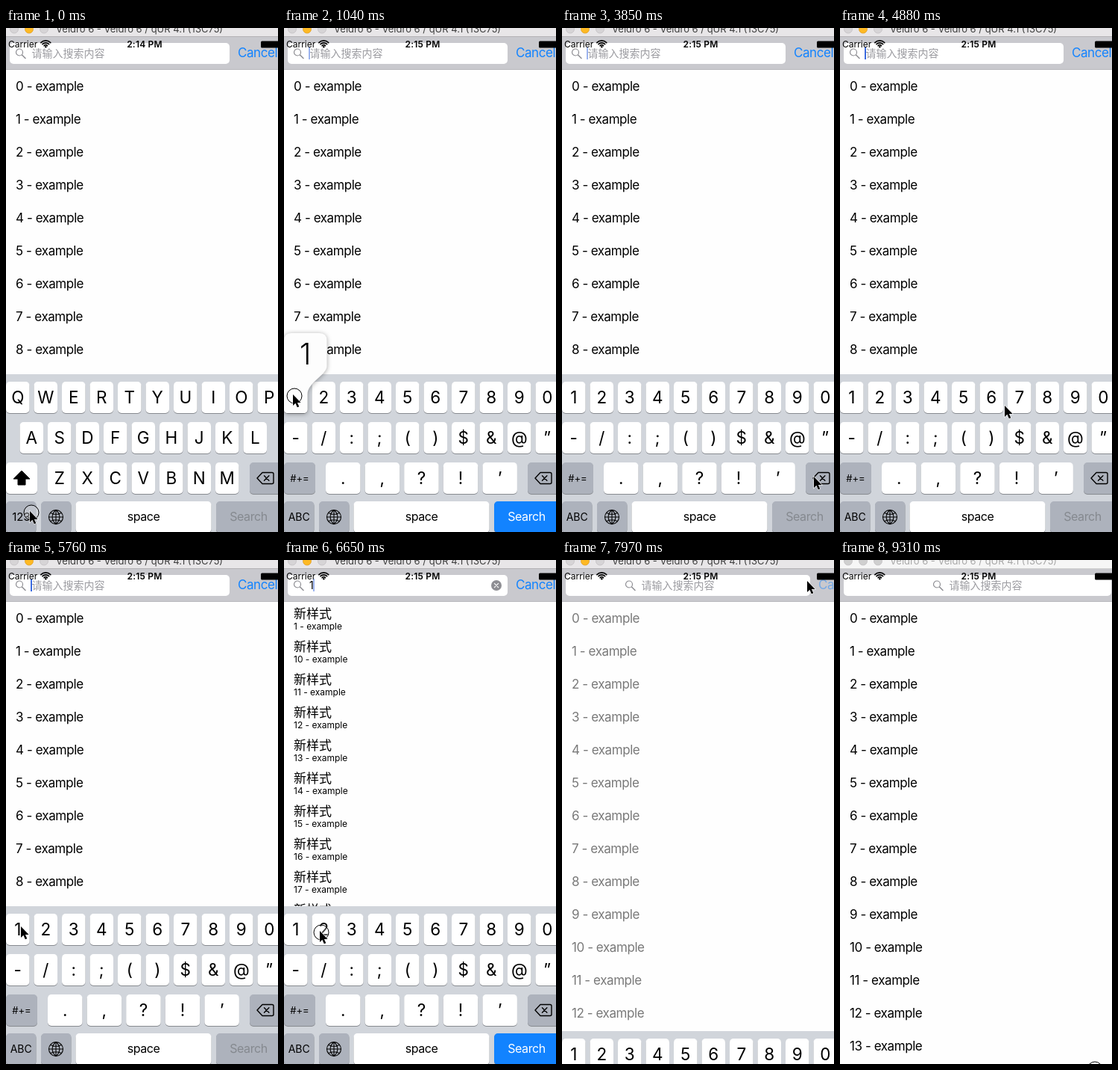
An HTML page for the animation above (9.41 s loop, 365 by 674 pixels).

```html
<!DOCTYPE html>
<html lang="zh-CN">
<head>
<meta charset="utf-8">
<title>Search demo</title>
<style>
html, body { margin: 0; width: 100%; height: 100%; overflow: hidden; background: #fff; }
svg { display: block; width: 365px; height: 674px; }
text { font-family: Inter, "Noto Sans CJK SC", "Noto Sans CJK", sans-serif; white-space: pre; }
.mid { text-anchor: middle; }
</style>
</head>
<body>
<svg id="stage" viewBox="0 0 365 674"></svg>
<script>
const stage = document.getElementById('stage');

function add(parent, tag, attrs, content) {
  const el = document.createElementNS('http://www.w3.org/2000/svg', tag);
  for (const k in attrs) el.setAttribute(k, attrs[k]);
  if (content !== undefined) el.textContent = content;
  parent.appendChild(el);
  return el;
}
const group = (parent = stage) => add(parent, 'g', {});
const rect = (p, x, y, width, height, fill, rx = 0) => add(p, 'rect', { x, y, width, height, fill, rx });
const line = (p, d, stroke, w = 1) => add(p, 'path', { d, stroke, 'stroke-width': w, fill: 'none', 'stroke-linecap': 'round' });
const text = (p, x, y, str, size, fill = '#000', more = {}) => add(p, 'text', { x, y, 'font-size': size, fill, ...more }, str);
const centred = (p, x, y, str, size, fill, more) => text(p, x, y + size * 0.364, str, size, fill, { class: 'mid', ...more });
const show = (el, on) => { el.style.display = on ? '' : 'none'; };
const move = (el, x, y) => el.setAttribute('transform', `translate(${x} ${y})`);
const within = (n, ...spans) => spans.some(([a, b]) => n >= a && n < b);

const GREY = '#8e8e93', BLUE = '#1283ff', TIGHT = { 'letter-spacing': -0.43 };

// Lists
rect(stage, 0, 0, 365, 674, '#fefefe');
const fullList = group();
for (let i = 0; i < 14; i++) text(fullList, 13, 83.7 + 44 * i, i + ' - example', 17, '#000', TIGHT);

function results(nums) {
  const g = group();
  nums.forEach((num, i) => {
    text(g, 13, 77.5 + 44 * i, '新样式', 17);
    text(g, 13, 93.3 + 44 * i, num + ' - example', 12);
  });
  return g;
}
const oneList = results([1, 10, 11, 12, 13, 14, 15, 16, 17, 18]);
const twelveList = results([12]);

// Search bar
rect(stage, 0, 11, 365, 45, '#c9c9ce');
rect(stage, 0, 55, 365, 1, '#b8b8bd');
const field = rect(stage, 5, 20, 295, 28, '#fff', 5);
const lens = group();
add(lens, 'circle', { cx: 5, cy: 5, r: 4.5, fill: 'none', stroke: GREY, 'stroke-width': 1.2 });
line(lens, 'M8.5 8.5L13 13', GREY, 1.5);
const hint = text(stage, 0, 38.8, '请输入搜索内容', 14, '#9b9ba0');
const query = text(stage, 34, 38.8, '', 14);
const clear = group();
add(clear, 'circle', { cx: 285, cy: 34, r: 7, fill: GREY });
line(clear, 'M282.4 31.4l5.2 5.2m0-5.2l-5.2 5.2', '#fff', 1.2);
const caret = rect(stage, 0, 25, 2, 17, '#3b6be0');
const cancel = text(stage, 311, 39.4, 'Cancel', 17, BLUE, TIGHT);

// Title bar
const titleBar = rect(stage, 0, 0, 365, 11, '#e8e6e8');
const titleEdge = rect(stage, 0, 11, 365, 1, '#b4b2b5');
const lights = [11, 31, 51].map(cx => add(stage, 'circle', { cx, cy: 1.5, r: 5.5, 'stroke-width': 0.8 }));
const title = text(stage, 67, 6, 'Veldro 6 - Veldro 6 / qUR 4.1 (13C75)', 13);

// Status bar
text(stage, 3, 26.4, 'Carrier', 12);
for (const r of [3.2, 6.2, 9.2]) {
  const s = r * 0.7;
  line(stage, `M${53.3 - s} ${26 - s}A${r} ${r} 0 0 1 ${53.3 + s} ${26 - s}`, '#000', 1.7);
}
add(stage, 'circle', { cx: 53.3, cy: 25.2, r: 1.2 });
const clock = centred(stage, 186, 22, '', 12, '#000', { 'font-weight': 600, 'letter-spacing': 0.2 });
rect(stage, 342, 17.5, 26, 9, '#000', 1.5);

// Keyboard
const board = group();
rect(board, 0, 463, 365, 211, '#d1d5db');

function key(p, x, y, w, fill = '#fff') {
  rect(p, x, y + 1, w, 42, '#888b90', 5);
  return rect(p, x, y, w, 42, fill, 5);
}
function row(p, chars, x, y, step = 37.5, w = 31.5) {
  [...chars].forEach((c, i) => {
    key(p, x + step * i, y, w);
    centred(p, x + step * i + w / 2, y + 21, c, 22.5);
  });
}
const DARK = '#adb2bc';

const letters = group(board);
row(letters, 'QWERTYUIOP', 0, 473);
row(letters, 'ASDFGHJKL', 18.5, 527);
row(letters, 'ZXCVBNM', 56, 581);
key(letters, 0, 581, 42);
add(letters, 'path', { d: 'M21 592L32 603H26V611H16V603H10Z', 'stroke-linejoin': 'round', stroke: '#000' });
key(letters, 0, 633, 40.5, DARK);
centred(letters, 20.5, 654, '123', 15);

const digits = group(board);
row(digits, '1234567890', 0, 473);
row(digits, '-/:;()$&@”', 0, 527);
row(digits, '.,?!’', 56, 581, 52.6, 46.5);
key(digits, 0, 581, 42, DARK);
centred(digits, 21, 602, '#+=', 13);
key(digits, 0, 633, 40.5, DARK);
centred(digits, 20.2, 654, 'ABC', 14);

const erase = key(board, 327, 581, 42, DARK);
add(board, 'path', { d: 'M337 602L344 594.5H357Q359 594.5 359 596.5V607.5Q359 609.5 357 609.5H344Z',
  fill: 'none', stroke: '#000', 'stroke-width': 1.4, 'stroke-linejoin': 'round' });
line(board, 'M346.5 598.8l6.4 6.4m0-6.4l-6.4 6.4', '#000', 1.4);

key(board, 47, 633, 40.5, DARK);
line(board, 'M57.5 654a9.5 9.5 0 1 1 19 0a9.5 9.5 0 1 1-19 0H76.5M67 644.5V663.5' +
  'M67 644.5C60.5 650 60.5 658 67 663.5C73.5 658 73.5 650 67 644.5' +
  'M59.8 648.5Q67 652 74.2 648.5M59.8 659.5Q67 656 74.2 659.5', '#000', 1.1);

key(board, 93.5, 633, 182);
centred(board, 184.5, 653, 'space', 16, '#000', TIGHT);
const go = key(board, 282, 633, 90, DARK);
const goText = centred(board, 325.5, 653, 'Search', 16, '#85898f', TIGHT);

// Enlarged key: k is the key's left edge, b the balloon's
function balloon(k, b, c) {
  const g = group(), e = b + 57.5, r = k + 31.5;
  const left = b === k ? `V418` : `V490C${k} 474 ${b} 468 ${b} 452V418`;
  add(g, 'path', {
    d: `M${b} 418Q${b} 408 ${b + 10} 408H${e - 10}Q${e} 408 ${e} 418V452C${e} 464 ${r} 474 ${r} 490` +
       `V510Q${r} 515 ${r - 5} 515H${k + 5}Q${k} 515 ${k} 510${left}Z`,
    fill: '#fdfdfd', style: 'filter:drop-shadow(0 1px 3px rgba(0,0,0,.35))'
  });
  centred(g, (b + e) / 2, 436, c, 39, '#000', { 'font-weight': 300 });
  return g;
}
const pop1 = balloon(0, 0, '1');
const pop2 = balloon(37.5, 24.5, '2');

// Pointer
const pointer = group();
const ring = add(pointer, 'circle', { cx: 2, cy: 2, r: 10, fill: 'rgba(255,255,255,.25)', stroke: '#000', 'stroke-width': 1 });
add(pointer, 'path', { d: 'M0 0V15L3.4 11.8L5.8 17.3L8.3 16.2L5.9 10.9H10.6Z', stroke: '#fff', 'stroke-width': 1.2, 'paint-order': 'stroke' });

// Time is counted in ticks; the picture changes only on a tick
const LOOP = 9410, TICK = 147.7;
const path = [ // tick, x, y
  [0, 32, 646], [1, 32, 646], [2, 30, 628], [3, 24, 580], [4, 16, 520], [5, 12, 492], [6, 12, 490],
  [13, 12, 490], [14, 14, 490], [15, 23, 490], [16, 36, 491], [17, 36, 491],
  [18, 110, 515], [20, 285, 592], [21, 321, 603], [22, 338, 600], [26, 338, 600],
  [30, 276, 519], [31, 276, 519], [32, 262, 512], [33, 221, 505], [36, 60, 491], [38, 22, 490], [39, 20, 490],
  [43, 20, 490], [45, 48, 496], [46, 48, 496], [47, 110, 380], [48, 250, 110], [50, 322, 34], [51, 329, 28],
  [55, 329, 28], [56, 331, 70], [57, 334, 210], [58, 338, 470], [59, 340, 690], [62, 340, 690], [63, 340, 679]
];
function pointerAt(n) {
  const i = path.findIndex(p => p[0] >= n);
  if (i <= 0) return path[0].slice(1);
  const [t0, x0, y0] = path[i - 1], [t1, x1, y1] = path[i];
  const f = (n - t0) / (t1 - t0);
  return [x0 + (x1 - x0) * f, y0 + (y1 - y0) * f];
}

const blink = [1, 1, 1, 0.5, 0, 0, 0.5];
const blinkStarts = [47, 42, 31, 23, 8, 1, -4];
const caretAt = n => n > 53 ? 0 : blink[(n - blinkStarts.find(s => s <= n)) % 7];

function typedAt(n) {
  if (within(n, [47, 54])) return '12';
  return within(n, [8, 23], [42, 47]) ? '1' : '';
}

function draw(n) {
  const typed = typedAt(n), closing = n === 54, closed = n > 54, blurred = n === 63;

  show(fullList, !typed);
  show(oneList, typed === '1');
  show(twelveList, typed === '12');
  fullList.setAttribute('opacity', closing ? 0.52 : 1);

  const lensX = closed ? 125 : closing ? 85 : 13;
  field.setAttribute('width', closed ? 359 : closing ? 328 : 295);
  move(lens, lensX, 27.5);
  hint.setAttribute('x', lensX + 21.5);
  show(hint, !typed);
  query.textContent = typed;
  show(clear, typed);
  caret.setAttribute('x', [33, 39, 48][typed.length]);
  caret.setAttribute('opacity', caretAt(n));
  cancel.setAttribute('x', closing ? 344 : 311);
  cancel.setAttribute('opacity', closing ? 0.45 : 1);
  show(cancel, !closed);

  titleBar.setAttribute('fill', blurred ? '#f6f6f6' : '#e8e6e8');
  titleEdge.setAttribute('fill', blurred ? '#d0d0d0' : '#b4b2b5');
  title.setAttribute('fill', blurred ? '#a8a8a8' : '#3f3f3f');
  lights.forEach((l, i) => {
    const amber = i === 1 && !blurred;
    l.setAttribute('fill', amber ? '#fdb924' : blurred ? '#cfcfcf' : '#d6d4d6');
    l.setAttribute('stroke', amber ? '#e0a02c' : '#c3c1c3');
  });
  clock.textContent = n < 4 ? '2:14 PM' : '2:15 PM';

  show(letters, n < 1);
  show(digits, n >= 1);
  move(board, 0, closing ? 167 : 0);
  show(board, !closed);
  erase.setAttribute('fill', within(n, [23, 26]) ? '#fff' : DARK);
  const ready = within(n, [7, 23], [41, 54]);
  go.setAttribute('fill', ready ? BLUE : DARK);
  goText.setAttribute('fill', ready ? '#fff' : '#85898f');

  show(pop1, n === 7 || n === 41);
  show(pop2, n === 46);
  move(pointer, ...pointerAt(n));
  show(ring, within(n, [0, 1], [7, 8], [23, 25], [41, 42], [45, 47], [53, 54], [63, 64]));
}

const start = performance.now();
let last = -1;
function run() {
  const t = (performance.now() - start) % LOOP;
  const n = Math.min(63, Math.floor((t + 6) / TICK));
  if (n !== last) draw(last = n);
  requestAnimationFrame(run);
}
run();
</script>
</body>
</html>
```
